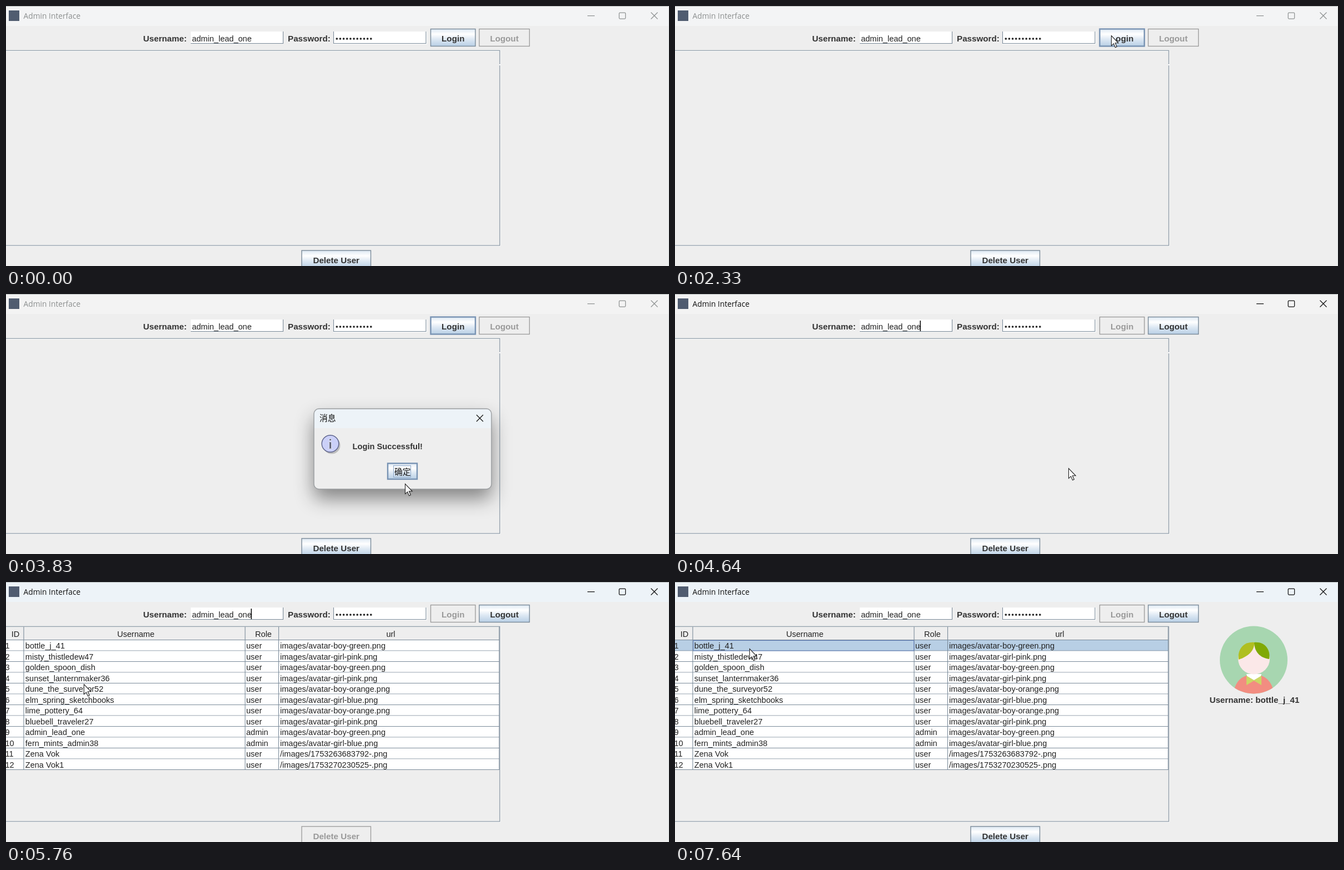
Animation of 1195x469 px, one loop 8 s. Source, as an HTML page:

```html
<!DOCTYPE html>
<html lang="en">
<head>
<meta charset="utf-8">
<title>Admin Interface</title>
<style>
  html, body { margin: 0; width: 100%; height: 100%; overflow: hidden; background: #eee; }
  svg { display: block; width: 1195px; height: 469px; }
  text { font: 14.55px "Liberation Sans", Arial, sans-serif; fill: #222; white-space: pre; }
  .bold { font-weight: bold; font-size: 15.2px; fill: #333; }
  .mid { text-anchor: middle; }
  .line { fill: none; stroke: #7a8a99; stroke-width: 1.1; }
  .title { font: 13.8px "Open Sans", "Noto Sans", sans-serif; fill: #111; }
  .cjk { font: 14.8px "Noto Sans CJK SC", "Noto Sans CJK", sans-serif; fill: #111; }
  .icons { fill: none; stroke: #111; stroke-width: 1.25; }
  .inactive .title { fill: #8c8f8f; }
  .inactive .icons { stroke: #8f9292; }
  .button rect { fill: url(#ocean); stroke: #7a8a99; stroke-width: 1.4; }
  .button.hot rect { stroke: #7893b3; stroke-width: 2.4; }
  .button.pressed rect { fill: #b8cfe5; }
  .button.off rect { fill: #eee; stroke: #999; stroke-width: 1.3; }
  .button.off text { fill: #999; }
</style>
</head>
<body>
<svg id="stage" viewBox="0 0 1195 469"></svg>
<script>
const LOOP = 8000;
const TABLE_AT = 4720, SELECT_AT = 7240, DETAIL_AT = 7640;

const users = [
  ["bottle_j_41", "boy-green"], ["misty_thistledew47", "girl-pink"],
  ["golden_spoon_dish", "boy-green"], ["sunset_lanternmaker36", "girl-pink"],
  ["dune_the_surveyor52", "boy-orange"], ["elm_spring_sketchbooks", "girl-blue"],
  ["lime_pottery_64", "boy-orange"], ["bluebell_traveler27", "girl-pink"],
  ["admin_lead_one", "boy-green"], ["fern_mints_admin38", "girl-blue"],
  ["Zena Vok", 1753263683792], ["Zena Vok1", 1753270230525],
];

const text = (x, y, s, cls = "") => `<text x="${x}" y="${y}" class="${cls}">${s}</text>`;
const rect = (x, y, w, h, attrs) => `<rect x="${x}" y="${y}" width="${w}" height="${h}" ${attrs}/>`;
const path = (d, attrs = 'class="line"') => `<path d="${d}" ${attrs}/>`;
const button = (id, x, y, w, h, label) =>
  `<g id="${id}" class="button">${rect(x, y, w, h, "")}${text(x + w / 2, y + 22.5, label, "bold mid")}</g>`;

function tableRow([name, image], i) {
  const y = 105 + 19.5 * i, base = y + 15.2;
  const url = typeof image === "number" ? `/images/${image}-.png` : `images/avatar-${image}.png`;
  return rect(-2, y, 891, 19.5, `fill="#fff" ${i ? "" : 'id="firstRow"'}`) +
    path(`M0 ${y + 19}H889`) +
    text(-1.5, base, i + 1) + text(34.8, base, name) +
    text(433, base, i === 8 || i === 9 ? "admin" : "user") + text(494, base, url);
}

const defs = `<defs>
  <linearGradient id="ocean" x2="0" y2="1">
    <stop stop-color="#dde8f3"/><stop offset=".3" stop-color="#fff"/>
    <stop offset=".6" stop-color="#dde8f3"/><stop offset="1" stop-color="#b8cfe5"/>
  </linearGradient>
  <filter id="shadow" x="-30%" y="-40%" width="160%" height="200%">
    <feDropShadow dx="0" dy="17" stdDeviation="17" flood-opacity=".45"/>
  </filter>
  <clipPath id="disc"><circle cx="1043" cy="140.5" r="61"/></clipPath>
</defs>`;

const titleBar = `<g id="titleBar">
  ${rect(0, 0, 1195, 36, 'fill="#f3f3f3"')}
  ${rect(0, 0, 1195, 36, 'fill="#edf3f8" id="tint"')}
  ${rect(5, 8, 19, 19, 'fill="#505c70"')}
  ${text(31.5, 23, "Admin Interface", "title")}
  ${path("M1048 17.5H1061M1162.5 11.5L1174.5 23.5M1174.5 11.5L1162.5 23.5", 'class="icons"')}
  ${rect(1105.2, 12, 11.4, 11, 'rx="1.5" class="icons"')}
  ${rect(0, 0, 1195, 1, 'fill="#b3b8b8"')}
  ${rect(1194, 0, 1, 469, 'fill="#dcdfdf"')}
</g>`;

const form = text(247.3, 64, "Username:", "bold") + text(508, 64, "Password:", "bold") +
  rect(333, 46, 167, 22, 'fill="#fff"') + rect(590, 46, 169, 23, 'fill="#fff"') +
  path("M333 67.5H499.5V46M590.5 46V67.5H757V46") +
  text(335.2, 64, "admin_lead_one") +
  path("M596.3 59H658.5", 'stroke="#222" stroke-width="3.7" stroke-linecap="round" stroke-dasharray="0 6.15"') +
  rect(441.4, 48, 1.5, 19, 'fill="#000" id="caret"') +
  button("login", 765.5, 41.5, 80.5, 31, "Login") +
  button("logout", 853, 41.5, 90.5, 31, "Logout") +
  button("remove", 533, 441, 124.5, 32, "Delete User");

const pane = path("M0 81.5H889M891 80V433H0", 'fill="none" stroke="#fff"') +
  path("M0 80.3H890V432H0") + rect(889, 105, 2, 2, 'fill="#fff" id="notch"');

const table = `<g id="table">
  ${rect(0, 81, 889, 24, 'fill="#eee"')}
  ${text(17, 99, "ID", "mid")}${text(234, 99, "Username", "mid")}
  ${text(464, 99, "Role", "mid")}${text(693.5, 99, "url", "mid")}
  ${users.map(tableRow).join("")}
  ${path("M0 104.5H889M32 81V339M431 81V339M491.5 81V339M889 81V339")}
  ${rect(33, 105.5, 397.5, 18.5, 'fill="none" stroke="#6382bf" id="cellFocus"')}
</g>`;

const profile = `<g id="profile">
  <g clip-path="url(#disc)">
    ${rect(980, 78, 126, 126, 'fill="#a7d6b0"')}
    ${path("M1006 204Q1010 168 1043 166Q1076 168 1080 204Z", 'fill="#f28d81"')}
    ${path("M1030 166H1057L1054 177H1033Z", 'fill="#fff"')}
    <ellipse cx="1043.5" cy="139" rx="28.5" ry="27.5" fill="#fbe8e8"/>
    ${path("M1016 140C1013 122 1025 107 1044 109C1045 123 1034 134 1016 140Z", 'fill="#b0bf20"')}
    ${path("M1044 109C1062 107 1074 121 1071 139C1054 137 1044 125 1044 109Z", 'fill="#80a904"')}
    ${path("M1030 169L1043.5 177L1057 169V186L1043.5 178L1030 186Z", 'fill="#cbd766"')}
  </g>
  ${text(1044.5, 218, "Username: " + users[0][0], "bold mid")}
</g>`;

const dialog = `<g id="dialog">
  ${rect(555, 207, 320, 145, 'rx="9" fill="#eee" filter="url(#shadow)"')}
  ${path("M555 242V216Q555 207 564 207H866Q875 207 875 216V242Z", 'fill="#edf3f8"')}
  ${rect(555, 207, 320, 145, 'rx="9" fill="none" stroke="#9a9da0" stroke-width="1.4"')}
  ${text(565, 229.3, "消息", "cjk")}
  ${path("M848 218L860 230M860 218L848 230", 'class="icons"')}
  <circle cx="587" cy="273" r="15.5" fill="#000" opacity=".2"/>
  <circle cx="584.5" cy="270" r="15.3" fill="#cbd0f8" stroke="#5b6189" stroke-width="1.4"/>
  <text x="584.5" y="278.5" class="mid" style="font:bold 25px 'Liberation Serif',serif;fill:#606478;stroke:#fff;stroke-width:.6">i</text>
  <text x="624.5" y="280" class="bold" style="font-size:14.7px">Login Successful!</text>
  <g id="confirm" class="button hot">${rect(688, 305.5, 53, 28.5, "")}</g>
  ${rect(698.5, 309.5, 31, 21, 'fill="none" stroke="#8fa9c9"')}
  ${text(700, 326, "确定", "cjk")}
</g>`;

const cursor = path("M.5 .5V18.6L4.6 14.9L7.6 21.7L10.4 20.4L7.4 13.8H13.2Z",
  'id="cursor" fill="#fff" stroke="#222" stroke-width="1.1"');

document.getElementById("stage").innerHTML =
  defs + titleBar + form + pane + table + profile + dialog + cursor;

// Each move: start, end, number of positions, then points [fraction, x, y].
const moves = [
  [720, 1400, 11, [0, 1098, 359], [.3, 930, 180], [.6, 790, 96], [1, 747, 167]],
  [1800, 2330, 8, [0, 749, 157], [.4, 772, 90], [.75, 786, 53], [1, 786, 53]],
  [3480, 4180, 11, [0, 784, 66], [.25, 745, 230], [.5, 719, 342], [.65, 714, 352], [1, 709, 314]],
  [5500, 6180, 11, [0, 660, 300], [.2, 320, 232], [.4, 140, 184], [.6, 130, 160], [1, 137, 125]],
  [6710, 6910, 3, [0, 136, 122], [1, 134, 120]],
  [7110, 7370, 3, [0, 130, 120], [1, 119, 120]],
  [7640, 7641, 2, [0, 134, 120], [1, 134, 120]],
];
const tintKeys = [[0, .2], [2530, .2], [2740, 1], [2860, .9], [3090, 0], [4640, 0], [4910, 1]];

function track(keys, t, column = 1) {
  const next = keys.findIndex(key => key[0] > t);
  if (next < 0) return keys[keys.length - 1][column];
  const a = keys[next - 1], b = keys[next];
  return a[column] + (b[column] - a[column]) * (t - a[0]) / (b[0] - a[0]);
}

const within = (t, from, to) => t >= from && t < to;
const el = id => document.getElementById(id);
const show = (id, on) => el(id).setAttribute("visibility", on ? "visible" : "hidden");
const mark = (id, cls, on) => el(id).classList.toggle(cls, on);

function drawCursor(t) {
  const move = moves.filter(m => m[0] <= t).pop();
  show("cursor", move);
  if (!move) return;
  const [start, end, count, ...points] = move;
  const last = count - 1;
  const u = Math.min(last, Math.floor((t - start) / (end - start) * last + .3)) / last;
  el("cursor").setAttribute("transform", `translate(${track(points, u, 1)} ${track(points, u, 2)})`);
}

function drawDialog(t) {
  const p = Math.max(0, Math.min(1, (t - 2800) / 250));
  const eased = 1 - (1 - p) ** 3, scale = .82 + .18 * eased;
  show("dialog", within(t, 2800, 4640));
  el("dialog").setAttribute("opacity", eased);
  el("dialog").setAttribute("transform", `translate(638 243) scale(${scale}) translate(-638 -243)`);
  mark("confirm", "pressed", t >= 4440);
}

function draw(now) {
  const t = now % LOOP;
  const loggedIn = t >= 4640, selected = t >= SELECT_AT;

  mark("titleBar", "inactive", !loggedIn && !within(t, 2530, 2800));
  el("tint").setAttribute("opacity", track(tintKeys, t));

  mark("login", "off", loggedIn);
  mark("login", "hot", within(t, 2180, 4640));
  mark("login", "pressed", within(t, 2530, 2600));
  mark("logout", "off", !loggedIn);
  mark("remove", "off", within(t, TABLE_AT, DETAIL_AT));
  show("caret", within(t, 4640, 5170) || within(t, 5640, 6180) || within(t, 6710, SELECT_AT));

  show("notch", t < TABLE_AT);
  el("table").style.display = t < TABLE_AT ? "none" : "";
  el("firstRow").setAttribute("fill", selected ? "#b8cfe5" : "#fff");
  show("cellFocus", selected);
  show("profile", t >= DETAIL_AT);

  drawDialog(t);
  drawCursor(t);
  requestAnimationFrame(draw);
}
requestAnimationFrame(draw);
</script>
</body>
</html>
```
